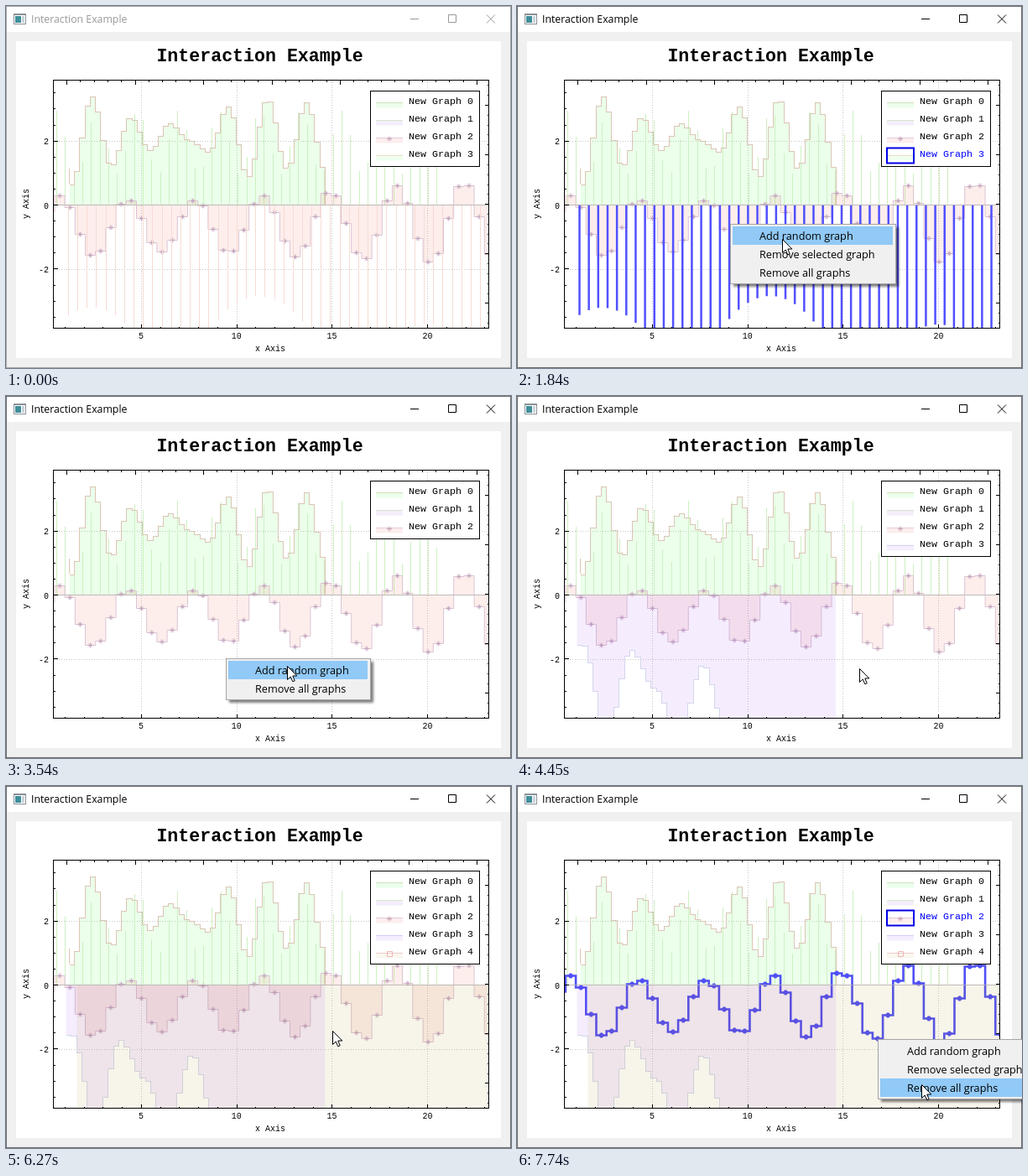
An HTML page that plays this animation: 602x432 px, repeating every 8 s.

```html
<!DOCTYPE html>
<html lang="en">
<head>
<meta charset="utf-8">
<title>Interaction Example</title>
<style>
  html, body { margin: 0; width: 100%; height: 100%; overflow: hidden; background: #f0f0f0; }
  svg { display: block; }
  text { white-space: pre; }
  .ui { font-family: "Open Sans", "Noto Sans", sans-serif; }
  .mono { font-family: "Liberation Mono", "DejaVu Sans Mono", monospace; }
  .crisp { shape-rendering: crispEdges; }
  .line { fill: none; stroke-width: 1; }
  #wave { stroke: #dcc4d4; }
  #stars { stroke: #c6a9c0; stroke-width: 1; fill: none; }
  .selected #wave, .selected #stars { stroke: #5050f5; stroke-width: 2.6; }
  .selected #waveFill { display: none; }
  #impulses { stroke: #f6dbd2; stroke-width: 1; }
  #impulses.on { stroke: #5050ff; stroke-width: 2.5; }
</style>
</head>
<body>
<svg id="stage" width="602" height="432" viewBox="0 0 602 432"></svg>
<script>
(() => {
const LOOP = 8000, ZERO = 237.5;
const plot = { left: 56.5, top: 88.5, right: 575.5, bottom: 384.5 };
const stage = document.getElementById('stage');
const $ = id => document.getElementById(id);
const range = (n, fn) => Array.from({ length: n }, (_, i) => fn(i));
const ease = u => (1 - Math.cos(Math.PI * u)) / 2;

// Curve that eases through evenly spaced crests and troughs.
const swell = (x0, gap, turns) => x => {
  const p = Math.min(Math.max((x - x0) / gap, 0), turns.length - 1.001);
  const i = Math.floor(p);
  return turns[i] + (turns[i + 1] - turns[i]) * ease(p - i);
};
// Staircase of n cells; the height is taken at the middle of each cell.
const stairs = (x0, dx, n, fn) => range(n, i =>
  `${i ? 'V' : `M${x0},`}${Math.round(fn(x0 + dx * (i + .5), i)) + .5}H${(x0 + dx * (i + 1)).toFixed(1)}`).join('');
const toZero = (path, x0) => `${path}V${ZERO}H${x0}Z`;
const bar = (x, y) => `M${x},${ZERO}V${y}`;
const star = (x, y, r = 3) =>
  `M${x - r},${y}h${2 * r}M${x},${y - r}v${2 * r}M${x - 2},${y - 2}l4,4M${x + 2},${y - 2}l-4,4`;

const hump = stairs(75.5, 6.22, 49,
  swell(79, 23.3, [213, 107, 191, 133, 172, 140, 160, 174, 120, 204, 111, 194, 115, 200]));
const basin = stairs(71.5, 6.3, 49,
  swell(79, 28.6, [297, 405, 303, 349, 405, 320, 405, 405]));
const waveY = i => 264 - .13 * i - (30 + .7 * Math.abs(i - 12)) * Math.cos(2 * Math.PI * (i - 1.1) / 6.57);
const wave = stairs(45.7, 12.2, 44, (x, i) => waveY(i));
const stars = range(44, i => star(+(51.8 + 12.2 * i).toFixed(1), Math.round(waveY(i)) + .5)).join('');

const upBars = range(45, i => {
  const x = 60.5 + 10.3 * i;
  return bar(x, ZERO - 75 - 38 * Math.cos(2 * Math.PI * (x - 60) / 48.6));
}).join('');
const downBars = range(45, i => {
  const x = 74.5 + 11.16 * i, arch = Math.round((x - 102) / 200);
  const centre = 102 + 200 * arch;
  return bar(x, Math.min([360, 346, 380][arch] + .0115 * (x - centre) ** 2, 385));
}).join('');

// Ticks along one side; every nth one is long.
const ticks = (origin, step, min, max, nth, draw) => range(80, i => {
  const k = i - 40, p = Math.round(origin + k * step) + .5;
  return p > min && p < max ? draw(p, k % nth ? 2 : 5) : '';
}).join('');
const { left, right, bottom } = plot;
const axisTicks =
  ticks(47, 22.75, left, right, 5, (x, n) => `M${x},${bottom}v${-n}`) +
  ticks(72, 16.3, left, right, 5, (x, n) => `M${x},${plot.top}v${n}`) +
  ticks(237, 19.1, plot.top, bottom, 4, (y, n) => `M${left},${y}h${n}`) +
  ticks(118, 11.82, plot.top, bottom, 5, (y, n) => `M${right},${y}h${-n}`);

const label = (x, y, size, text, extra = '') =>
  `<text class="mono" x="${x}" y="${y}" font-size="${size}" ${extra}>${text}</text>`;

const legendStyles = [
  ['#cfe0bb', '#ebffeb'], ['#d3e8c8', '#f4eefa'], ['#e3cbd8', '#fdeeee'],
  ['#e8dfc4', '#f0fff0'], ['#efcaca', '#faf7ee']];
const legendRow = ([stroke, fill], i) => {
  const y = 115.5 + 21 * i;
  const mark = i === 2 ? `<path d="${star(457, y + 1)}" stroke="#d0aabf" fill="none"/>`
    : i === 4 ? `<path d="M454.5,${y - 2}h6v6h-6z" stroke="#efb6b6" fill="none"/>` : '';
  return `<g id="row${i}">
    <rect id="swatch${i}" x="441" y="${y}" width="32" height="6" fill="${fill}"/>
    <path id="dash${i}" class="crisp" d="M441,${y}h32" stroke="${stroke}"/>${mark}
    <rect id="box${i}" x="441" y="${y - 9}" width="32" height="18" fill="none" stroke="#0000e6" stroke-width="2"/>
    ${label(480, 117 + 21 * i, 11.67, `New Graph ${i}`, `id="name${i}"`)}</g>`;
};

const frame = `x="${left}" y="${plot.top}" width="${right - left}" height="${bottom - plot.top}"`;
stage.innerHTML = `
<defs><clipPath id="inside"><rect ${frame}/></clipPath>
<filter id="soft" x="-10%" y="-20%" width="120%" height="140%"><feGaussianBlur stdDeviation="1.5"/></filter></defs>
<rect width="602" height="432" fill="#f0f0f0"/>
<rect width="602" height="31" fill="#fff"/>
<g class="crisp"><rect x="9" y="9" width="15" height="13" fill="#8a9096"/>
  <rect x="10" y="11" width="13" height="10" fill="#fff"/><rect x="11" y="12" width="7" height="8" fill="#3f8f9a"/>
  <rect x="19" y="12" width="3" height="8" fill="#c9d3da"/></g>
<text id="caption" class="ui" x="30" y="20" font-size="12.3">Interaction Example</text>
<path id="buttons" d="M482,15.5h10M527.5,10.5h9v9h-9zM573,10.5l10,10M583,10.5l-10,10" fill="none"/>
<rect id="border" x=".5" y=".5" width="601" height="431" fill="none"/>
<rect x="12" y="42" width="578" height="378" fill="#fff"/>
${label(302.5, 66, 21.6, 'Interaction Example', 'font-weight="bold" text-anchor="middle"')}
<g class="crisp" stroke="#c8c8c8">
  <path d="M161.5,88V384M275.5,88V384M388.5,88V384M502.5,88V384M57,161.5H575M57,314.5H575" stroke-dasharray="1 2"/>
  <path d="M57,${ZERO}H575"/></g>
<g clip-path="url(#inside)">
  <path d="${toZero(hump, 75.5)}" fill="rgba(0,255,0,.08)"/>
  <path class="crisp" d="${upBars}" stroke="#cdf0c2"/>
  <path class="line crisp" d="M75.5,194V212${hump}V${ZERO}" stroke="#dcc5b4"/>
  <g id="graph2">
    <path id="waveFill" d="${toZero(wave, 45.7)}" fill="rgba(220,40,20,.08)"/>
    <path id="wave" class="line" d="${wave}"/><path id="stars" d="${stars}"/></g>
  <path id="impulses" d="${downBars}"/>
  <g id="graph3"><path d="${toZero(basin, 71.5)}" fill="rgba(130,30,240,.08)"/>
    <path class="line crisp" d="${basin}" stroke="#d3d6ec"/></g>
  <rect id="graph4" x="84.5" y="${ZERO}" width="500" height="160" fill="rgba(170,130,30,.09)"/>
  <path class="crisp" d="M57,${ZERO}H575" stroke="#bcb6b6" opacity=".7"/>
</g>
<g class="crisp" stroke="#000" fill="none"><rect ${frame}/><path d="${axisTicks}"/></g>
${range(4, i => label(161 + 113.8 * i, 397, 10, 5 * (i + 1), 'text-anchor="middle"')).join('')}
${range(3, i => label(51, 165 + 76.5 * i, 10, 2 - 2 * i, 'text-anchor="end"')).join('')}
${label(315, 412, 10, 'x Axis', 'text-anchor="middle"')}
${label(0, 0, 10, 'y Axis', 'text-anchor="middle" transform="translate(27 236) rotate(-90)"')}
<rect id="legend" class="crisp" x="434.5" y="101.5" width="130" fill="#fff" stroke="#000"/>
${legendStyles.map(legendRow).join('')}
<g id="menu"><rect id="shade" x="4" y="4" fill="#000" opacity=".5" filter="url(#soft)"/>
  <rect id="panel" class="crisp" x=".5" y=".5" fill="#f0f0f0" stroke="#a5a5a5"/>
  <rect id="hover" class="crisp" x="3" height="22" fill="#91c9f7"/>
  ${range(3, i => `<text id="item${i}" class="ui" x="35" y="${19 + 22 * i}" font-size="12.7"></text>`).join('')}</g>
<path id="cursor" d="M.5,.5V16.5L4.2,13 6.8,18.8 9.2,17.8 6.8,12H11.8Z" fill="#fff" stroke="#000"/>`;

const shortMenu = ['Add random graph', 'Remove all graphs'];
const longMenu = ['Add random graph', 'Remove selected graph', 'Remove all graphs'];
const menus = [
  { x: 254, y: 260, open: 1500, close: 2500, items: longMenu },
  { x: 262, y: 313, open: 3120, close: 3730, items: shortMenu },
  { x: 408, y: 325, open: 4870, close: 5520, items: shortMenu },
  { x: 430, y: 302, open: 6890, close: LOOP, items: longMenu }];

// Pointer moves: begin, end, then where it comes to rest.
const ENTER = { t: 190, x: 300, y: 432 };
const moves = [
  [190, 640, 259, 233], [1060, 1190, 254, 260], [1500, 1840, 316, 278], [1840, 2220, 338, 296],
  [2500, 2920, 262, 313], [3120, 3540, 335, 322], [4150, 4450, 408, 325], [4870, 5380, 447, 335],
  [5640, 5770, 445, 330], [5850, 6270, 389, 292], [6270, 6500, 430, 302], [6890, 7740, 482, 356]];

function pointerAt(t) {
  let { x, y } = ENTER;
  for (const [begin, end, toX, toY] of moves) {
    if (t < begin) break;
    const k = ease(Math.min(1, (t - begin) / (end - begin)));
    x += (toX - x) * k;
    y += (toY - y) * k;
  }
  return [Math.round(x), Math.round(y)];
}

const set = (id, attrs) => {
  for (const key in attrs) $(id).setAttribute(key, attrs[key]);
};
const show = (id, on) => set(id, { display: on ? 'inline' : 'none' });

function drawLegend(rows, picked, renewed) {
  set('legend', { height: 5.5 + 21 * rows });
  set('swatch3', { fill: renewed ? '#f6eeff' : legendStyles[3][1] });
  set('dash3', { stroke: renewed ? '#cfcff3' : legendStyles[3][0] });
  for (let i = 0; i < 5; i++) {
    show('row' + i, i < rows);
    show('box' + i, i === picked);
    set('name' + i, { fill: i === picked ? '#0000ff' : '#000' });
  }
}

function drawMenu(t, px, py) {
  const menu = menus.find(m => t >= m.open && t < m.close);
  show('menu', menu);
  if (!menu) return;
  const { x, y, items } = menu;
  const size = { width: items === longMenu ? 197 : 172, height: 22 * items.length + 5 };
  const row = Math.floor((py - y - 3) / 22);
  set('menu', { transform: `translate(${x} ${y})`, opacity: Math.min(1, .4 + (t - menu.open) / 200) });
  set('shade', size);
  set('panel', size);
  set('hover', { y: 3 + 22 * row, width: size.width - 6 });
  show('hover', row >= 0 && row < items.length && px > x + 2);
  for (let i = 0; i < 3; i++) $('item' + i).textContent = items[i] || '';
}

function render(t) {
  const active = t >= 450, removed = t >= 2500, third = t >= 3730, fourth = t >= 5520;
  const impulsesPicked = t >= 560 && !removed, wavePicked = t >= 6560;
  set('caption', { fill: active ? '#000' : '#999' });
  set('buttons', { stroke: active ? '#000' : '#999' });
  set('border', { stroke: active ? '#707070' : '#aaa' });
  show('impulses', !removed);
  set('impulses', { class: impulsesPicked ? 'on' : 'crisp' });
  set('graph2', { class: wavePicked ? 'selected' : '' });
  show('graph3', third);
  show('graph4', fourth);
  drawLegend(fourth ? 5 : removed && !third ? 3 : 4, impulsesPicked ? 3 : wavePicked ? 2 : -1, third);
  const [px, py] = pointerAt(t);
  show('cursor', t >= ENTER.t);
  set('cursor', { transform: `translate(${px} ${py})` });
  drawMenu(t, px, py);
}

let began;
function tick(now) {
  began ??= now;
  render((now - began) % LOOP);
  requestAnimationFrame(tick);
}
render(0);
requestAnimationFrame(tick);
})();
</script>
</body>
</html>
```
